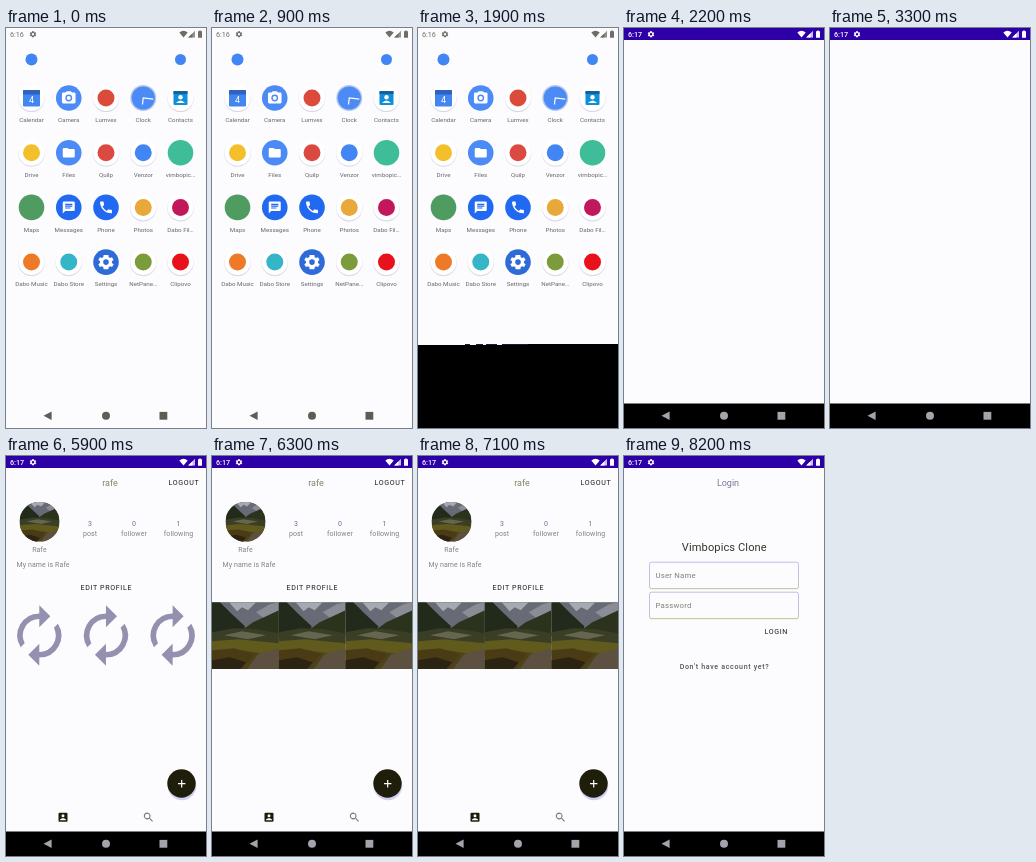
Animation, 200 px wide and 400 px high, one loop 8.3 s. Source, as an HTML page:

```html
<!DOCTYPE html>
<html lang="en">
<head>
<meta charset="utf-8">
<title>App launch</title>
<style>
  html, body { margin: 0; width: 100%; height: 100%; overflow: hidden; background: #fcfcfe; }
  svg { display: block; width: 100%; height: 100%; font-family: Roboto, sans-serif; }
  .label { font-size: 6.2px; fill: #66656c; text-anchor: middle; }
  .title { font-size: 9px; text-anchor: middle; }
  .body { font-size: 7px; letter-spacing: .1px; fill: #827f8a; }
  .mid { text-anchor: middle; }
  .button { font-size: 7.1px; letter-spacing: .65px; fill: #1c1a20; }
  .hint { font-size: 7.8px; letter-spacing: .2px; fill: #828078; }
</style>
</head>
<body>
<svg id="stage" viewBox="0 0 200 400"></svg>
<script>
const LOOP = 8300, STEP = 100;
const PAGE = '#fcfcfe', LIGHT_BLUE = '#4c8bf5', BLUE = '#2169f0';

const GLYPHS = {
  gear: 'M19.4 13a7.5 7.5 0 0 0 0-2l2.1-1.6-2-3.5-2.5 1a7.3 7.3 0 0 0-1.7-1L15 3H9l-.4 2.9a7.3 7.3 0 0 0-1.7 1l-2.5-1-2 3.5L4.5 11a7.5 7.5 0 0 0 0 2l-2.1 1.6 2 3.5 2.5-1a7.3 7.3 0 0 0 1.7 1L9 21h6l.4-2.9a7.3 7.3 0 0 0 1.7-1l2.5 1 2-3.5zM12 15.5a3.5 3.5 0 1 1 0-7 3.5 3.5 0 0 1 0 7z',
  camera: 'M9 2 7.2 4H4a2 2 0 0 0-2 2v12a2 2 0 0 0 2 2h16a2 2 0 0 0 2-2V6a2 2 0 0 0-2-2h-3.2L15 2zm3 15a5 5 0 1 1 0-10 5 5 0 0 1 0 10zm0-2a3 3 0 1 0 0-6 3 3 0 0 0 0 6z',
  folder: 'M10 4H4a2 2 0 0 0-2 2v12a2 2 0 0 0 2 2h16a2 2 0 0 0 2-2V8a2 2 0 0 0-2-2h-8z',
  bubble: 'M20 2H4a2 2 0 0 0-2 2v18l4-4h14a2 2 0 0 0 2-2V4a2 2 0 0 0-2-2zM6 6h12v2H6zm0 3h12v2H6zm0 3h9v2H6z',
  phone: 'M6.6 10.8a15 15 0 0 0 6.6 6.6l2.2-2.2a1 1 0 0 1 1-.2 11 11 0 0 0 3.6.6 1 1 0 0 1 1 1V20a1 1 0 0 1-1 1A17 17 0 0 1 3 4a1 1 0 0 1 1-1h3.5a1 1 0 0 1 1 1 11 11 0 0 0 .6 3.6 1 1 0 0 1-.25 1z',
  account: 'M3 5v14a2 2 0 0 0 2 2h14a2 2 0 0 0 2-2V5a2 2 0 0 0-2-2H5a2 2 0 0 0-2 2zm12 4a3 3 0 1 1-6 0 3 3 0 0 1 6 0zm-9 8c0-2 4-3.1 6-3.1s6 1.1 6 3.1v1H6z',
  search: 'M15.5 14h-.8l-.3-.3a6.5 6.5 0 1 0-.7.7l.3.3v.8l5 5 1.5-1.5zm-6 0a4.5 4.5 0 1 1 0-9 4.5 4.5 0 0 1 0 9z',
  renew: 'M12 6v3l4-4-4-4v3a8 8 0 0 0-6.76 12.26L6.7 14.8A6 6 0 0 1 12 6zm6.76 1.74L17.3 9.2A6 6 0 0 1 12 18v-3l-4 4 4 4v-3a8 8 0 0 0 6.76-12.26z'
};

const glyph = (name, x, y, scale, fill) =>
  `<path d="${GLYPHS[name]}" fill="${fill}" fill-rule="evenodd" transform="translate(${x} ${y}) scale(${scale}) translate(-12 -12)"/>`;
const rect = (x, y, w, h, fill, extra = '') =>
  `<rect x="${x}" y="${y}" width="${w}" height="${h}" fill="${fill}" ${extra}/>`;
const disc = (x, y, r, fill) => `<circle cx="${x}" cy="${y}" r="${r}" fill="${fill}"/>`;
const path = (d, fill, extra = '') => `<path d="${d}" fill="${fill}" ${extra}/>`;
const text = (x, y, cls, str, extra = '') => `<text x="${x}" y="${y}" class="${cls}" ${extra}>${str}</text>`;
const layer = (id, content) => `<g id="${id}" display="none">${content}</g>`;

const statusBar = (time, color, weight) =>
  text(4, 8.7, '', time, `font-size="7.2" font-weight="${weight}" fill="${color}"`) +
  glyph('gear', 27, 6.2, .34, color) +
  path('M173.3 4.5Q177.5 1.2 181.7 4.5L177.5 9.5z', color) +
  path('M189 2.7V9.5H182.2z', color, 'opacity=".75"') +
  path('M186.5 5.2V9.5H182.2z', color) +
  path('M192 3.3h1.2v-.9h1.6v.9H196v6.4h-4z', color);

const navBar = color =>
  path('M37.5 387.8 45.6 383.5V392z', color) +
  disc(100, 387.8, 4, color) + rect(153.5, 383.9, 7.8, 7.8, color);

const plate = (x, y) => disc(x, y + .8, 13.2, '#d9d8e6') + disc(x, y, 13, '#fff');
const solid = color => (x, y) => disc(x, y, 12.8, color);
const badge = color => (x, y) => plate(x, y) + disc(x, y, 8.5, color);
const symbol = (name, color, scale) => (x, y) => disc(x, y, 12.8, color) + glyph(name, x, y, scale, '#fff');

const calendar = (x, y) => plate(x, y) +
  rect(x - 8.5, y - 8, 17, 16.5, '#4386f0', 'rx="1"') + rect(x - 8.5, y - 8, 17, 4.5, '#2f62bd', 'rx="1"') +
  text(x, y + 4.6, 'mid', '4', 'font-size="9" fill="#fff"');
const clock = (x, y) => disc(x, y, 13, '#b4c8ee') + disc(x, y, 11.6, LIGHT_BLUE) +
  path(`M${x - .8} ${y + 6.5}L${x} ${y}L${x + 10} ${y + 1.2}`, 'none', 'stroke="#fff" stroke-width="1.2"');
const contacts = (x, y) => plate(x, y) +
  rect(x - 7, y - 7, 14, 14, '#0f8fd8', 'rx="1"') + rect(x - 7, y - 7, 14, 3, '#14609c') +
  disc(x, y - .8, 2.2, '#fff') + path(`M${x - 4.5} ${y + 5}q4.5-5 9 0z`, '#fff');

const APPS = [
  ['Calendar', calendar], ['Camera', symbol('camera', LIGHT_BLUE, .68)], ['Lumvex', badge('#dc4a3c')],
  ['Clock', clock], ['Contacts', contacts],
  ['Drive', badge('#f3c02c')], ['Files', symbol('folder', LIGHT_BLUE, .6)], ['Quilp', badge('#da4a40')],
  ['Venzor', badge('#4285f4')], ['vimbopic…', solid('#3fbd98')],
  ['Maps', solid('#4f9b60')], ['Messages', symbol('bubble', BLUE, .6)], ['Phone', symbol('phone', BLUE, .66)],
  ['Photos', badge('#e8a83a')], ['Dabo Fil…', badge('#c2185b')],
  ['Dabo Music', badge('#ee7a28')], ['Dabo Store', badge('#35b5c8')], ['Settings', symbol('gear', '#2f6ad9', .8)],
  ['NetPane…', badge('#7c9c3c')], ['Clipovo', badge('#e8121c')]
];

const home = rect(0, 0, 200, 400, PAGE) + statusBar('6:16', '#6e6d66', 400) +
  disc(25.5, 31.5, 6, '#4285f4') + disc(174.5, 31.5, 5.5, '#4285f4') +
  APPS.map(([name, draw], i) => {
    const x = 25.5 + 37.25 * (i % 5), y = 70 + 54.7 * Math.floor(i / 5);
    return draw(x, y) + text(x, y + 24.3, 'label', name);
  }).join('') + navBar('#5e5d55');

const opening = rect(0, 0, 200, 400, '#000') + rect(110, -1, 90, 1, '#000') +
  [[47, 5], [58, 7], [68, 11], [84, 26]].map(([x, w]) => rect(x, -1, w, 1, '#1c1838')).join('');

const app = rect(0, 0, 200, 400, PAGE) + rect(0, 0, 200, 12, '#2c00a6') + statusBar('6:17', '#fff', 500) +
  rect(0, 375.5, 200, 24.5, '#000') + navBar('#a5a2ac');

const header = text(104, 30, 'title', 'rafe', 'fill="#85846a"') + text(162.5, 29.3, 'button', 'LOGOUT') +
  glyph('account', 57, 361.3, .5, '#1c1c0a') + glyph('search', 142.5, 361.3, .52, '#77767a');

// Mountain valley in a 66.7 unit square.
const valley = rect(0, 0, 67, 67, '#4d431a') +
  rect(0, 0, 67, 26, '#686b76') +
  path('M17 0H44L36 8 30 5 25 9z', '#a6a8b2') +
  path('M44 10 58 2 67 0V8L52 16z', '#8b8d96') +
  path('M0 0H8L19 11 33 24 30 34H0z', '#222b1b') +
  path('M67 8 52 15 41 20 30 28V34H67z', '#2b331d') +
  path('M0 30 22 26 44 27 67 31V42H0z', '#3a3e25') +
  path('M12 33 30 29 54 33 36 37z', '#66654f') +
  path('M0 39 26 37 67 41V54L30 48 0 51z', '#605a1d') +
  path('M0 48 22 46 42 52 30 67H0z', '#4a3b15') +
  path('M67 46 46 52 35 67H67z', '#5c5140') +
  path('M0 58 18 55 34 60 28 67H0z', '#2b2413');

const stat = (x, count, name) =>
  text(x, 70.2, 'body mid', count, 'style="fill:#716b98"') + text(x, 79.5, 'body mid', name);
const profile =
  `<g clip-path="url(#round)"><use href="#valley" transform="translate(13.5 45.8) scale(.6)"/></g>` +
  text(33.5, 96, 'body mid', 'Rafe') + text(10.5, 110.7, 'body', 'My name is Rafe') +
  stat(84, 3, 'post') + stat(128, 0, 'follower') + stat(172.5, 1, 'following') +
  text(100.3, 134.3, 'button mid', 'EDIT PROFILE') +
  disc(176, 330, 14.3, '#d2cff0') + disc(175.5, 327.5, 14.2, '#1f1e0a') +
  path('M172 327.7h7.4M175.7 324v7.4', 'none', 'stroke="#fff" stroke-width="1.2"');

const cells = [0, 1, 2].map(i => i * 200 / 3);
const loading = cells.map(x => glyph('renew', x + 33.3, 179.5, 2.76, '#9490b0')).join('');
const photos = cells.map(x => `<use href="#valley" x="${x}" y="146.3"/>`).join('');

const field = (y, name) => rect(25.5, y, 149, 26.5, PAGE, 'rx="2" stroke="url(#edge)" stroke-width=".9"') +
  text(31.5, y + 16, 'hint', name);
const login = text(104, 30, 'title', 'Login', 'fill="#7b7496"') +
  text(100.3, 94.5, 'mid', 'Vimbopics Clone', 'font-size="11.1" letter-spacing=".1" fill="#35352e"') +
  field(106.2, 'User Name') + field(136.2, 'Password') +
  text(140.5, 178, 'button', 'LOGIN') +
  text(100.5, 212.6, 'button mid', 'Don\'t have account yet?', 'font-weight="500" style="fill:#55535c"');

const stage = document.getElementById('stage');
stage.innerHTML = `<defs>
  <clipPath id="cell"><rect width="66.7" height="66.7"/></clipPath>
  <clipPath id="round"><circle cx="33.5" cy="65.8" r="20"/></clipPath>
  <linearGradient id="edge" x2="0" y2="1">
    <stop stop-color="#bbb5e8"/><stop offset=".7" stop-color="#bdb9e0"/><stop offset="1" stop-color="#b8ba84"/>
  </linearGradient>
  <g id="valley" clip-path="url(#cell)">${valley}</g></defs>` +
  Object.entries({ home, opening, app, header, profile, loading, photos, login })
    .map(([id, content]) => layer(id, content)).join('');

// Start time, visible layers, top of the opening window.
const SCENES = [
  [0, 'home'],
  [1900, 'home opening', 317],
  [2000, 'home opening', 70],
  [2100, 'app'],
  [4000, 'app header'],
  [5100, 'app header profile loading'],
  [6200, 'app header profile photos'],
  [7300, 'app login']
];
const layers = [...stage.children].filter(el => el.tagName === 'g');
let current;

function render() {
  const time = Math.floor(performance.now() % LOOP / STEP) * STEP;
  const scene = SCENES.findLast(([start]) => start <= time);
  if (scene !== current) {
    current = scene;
    const [, names, top = 0] = scene;
    const shown = names.split(' ');
    for (const el of layers) el.setAttribute('display', shown.includes(el.id) ? 'inline' : 'none');
    document.getElementById('opening').setAttribute('transform', `translate(0 ${top})`);
  }
  requestAnimationFrame(render);
}
render();
</script>
</body>
</html>
```
